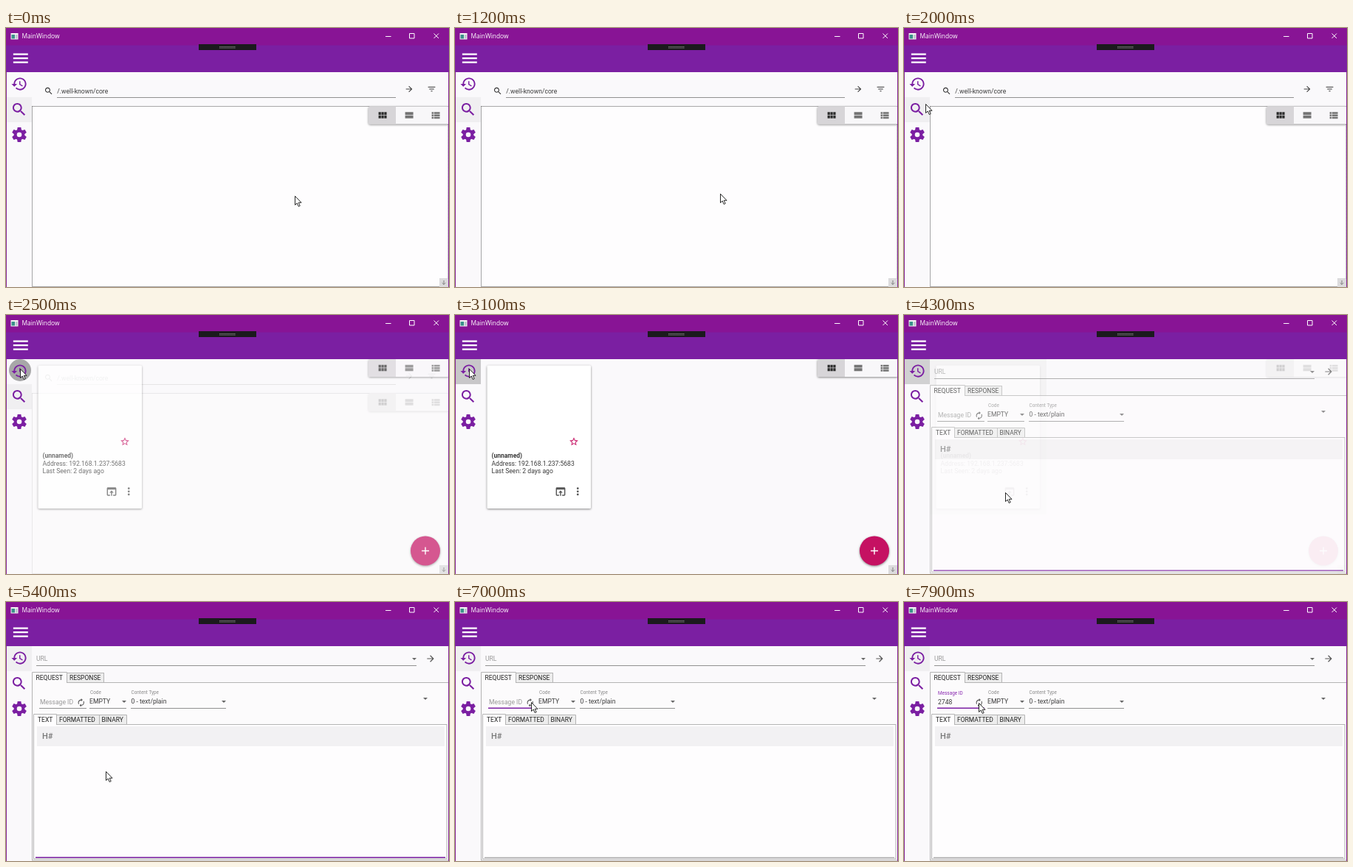
An HTML page for the animation above (8 s loop, 600x352 px).

```html
<!DOCTYPE html>
<html lang="en">
<head>
<meta charset="utf-8">
<title>MainWindow</title>
<style>
  html, body { margin: 0; width: 100%; height: 100%; overflow: hidden; background: #faf9fb; }
  svg { display: block; }
  text { font: 8.6px Roboto, "Open Sans", sans-serif; fill: #3a3a3a; white-space: pre; }
  .small { font-size: 6.4px; fill: #8a8a8a; }
  .hint { fill: #999; }
  .tab { font-size: 8.5px; fill: #222; }
  .title { font: 8.4px "Open Sans", "Noto Sans", sans-serif; fill: #fff; }
  .bold { font-weight: 700; font-size: 8.5px; }
  .side { fill: #7b1fa2; }
  .line { stroke: #909090; fill: none; }
  .card { fill: #fff; filter: drop-shadow(0 1px 1.5px #0007); }
  .box { stroke: #b4b4b4; }
  .accent { stroke: #7b1fa2; stroke-width: 1.6; }
</style>
</head>
<body>
<svg width="600" height="352" viewBox="0 0 600 352">
  <defs>
    <symbol id="menu" viewBox="0 0 24 24"><path d="M3 18h18v-2H3zm0-5h18v-2H3zm0-7v2h18V6z"/></symbol>
    <symbol id="history" viewBox="0 0 24 24"><path d="M13 3c-4.97 0-9 4.03-9 9H1l3.89 3.89.07.14L9 12H6c0-3.87 3.13-7 7-7s7 3.13 7 7-3.13 7-7 7c-1.93 0-3.68-.79-4.94-2.06l-1.42 1.42C8.27 19.99 10.51 21 13 21c4.97 0 9-4.03 9-9s-4.03-9-9-9zm-1 5v5l4.28 2.54.72-1.21-3.5-2.08V8z"/></symbol>
    <symbol id="search" viewBox="0 0 24 24"><path d="M15.5 14h-.79l-.28-.27C15.41 12.59 16 11.11 16 9.5 16 5.91 13.09 3 9.5 3S3 5.91 3 9.5 5.91 16 9.5 16c1.61 0 3.09-.59 4.23-1.57l.27.28v.79l5 4.99L20.49 19zm-6 0C7.01 14 5 11.99 5 9.5S7.01 5 9.5 5 14 7.01 14 9.5 11.99 14 9.5 14z"/></symbol>
    <symbol id="star" viewBox="0 0 24 24"><path d="M22 9.24l-7.19-.62L12 2 9.19 8.63 2 9.24l5.46 4.73L5.82 21 12 17.27 18.18 21l-1.63-7.03zM12 15.4l-3.76 2.27 1-4.28-3.32-2.88 4.38-.38L12 6.1l1.71 4.04 4.38.38-3.32 2.88 1 4.28z"/></symbol>
    <symbol id="open" viewBox="0 0 24 24"><path d="M19 4H5c-1.11 0-2 .9-2 2v12c0 1.1.89 2 2 2h4v-2H5V8h14v10h-4v2h4c1.1 0 2-.9 2-2V6c0-1.1-.89-2-2-2zm-7 6l-4 4h3v6h2v-6h3z"/></symbol>
    <symbol id="more" viewBox="0 0 24 24"><circle cx="12" cy="6" r="2"/><circle cx="12" cy="12" r="2"/><circle cx="12" cy="18" r="2"/></symbol>
    <symbol id="go" viewBox="0 0 24 24"><path d="M12 4l-1.41 1.41L16.17 11H4v2h12.17l-5.58 5.59L12 20l8-8z"/></symbol>
    <symbol id="filter" viewBox="0 0 24 24"><path d="M10 18h4v-2h-4zM3 6v2h18V6zm3 7h12v-2H6z"/></symbol>
    <symbol id="grid" viewBox="0 0 24 24"><path d="M4 11h5V5H4zm0 7h5v-6H4zm6 0h5v-6h-5zm6 0h5v-6h-5zm-6-7h5V5h-5zm6-6v6h5V5z"/></symbol>
    <symbol id="stream" viewBox="0 0 24 24"><path d="M4 18h17v-6H4zM4 5v6h17V5z"/></symbol>
    <symbol id="list" viewBox="0 0 24 24"><path d="M4 14h4v-4H4zm0 5h4v-4H4zM4 9h4V5H4zm5 5h12v-4H9zm0 5h12v-4H9zM9 5v4h12V5z"/></symbol>
    <symbol id="renew" viewBox="0 0 24 24"><path d="M12 6v3l4-4-4-4v3c-4.42 0-8 3.58-8 8 0 1.57.46 3.03 1.24 4.26L6.7 14.8c-.45-.83-.7-1.79-.7-2.8 0-3.31 2.69-6 6-6zm6.76 1.74L17.3 9.2c.44.84.7 1.79.7 2.8 0 3.31-2.69 6-6 6v-3l-4 4 4 4v-3c4.42 0 8-3.58 8-8 0-1.57-.46-3.03-1.24-4.26z"/></symbol>
    <path id="tooth" d="M-2.3 -10h4.6l.8 4.5h-6.2z"/>
    <path id="drop" d="M-3 -1.5h6l-3 3z" fill="#666"/>
    <g id="views">
      <rect class="card" x="491" width="109" height="24" rx="2" style="fill:#f8f7f9"/>
      <path d="M493 0h35v24h-35q-2 0-2-2V2q0-2 2-2z" fill="#d7d5d8"/>
      <use href="#grid" x="502" y="4.5" width="15.5" height="15.5" fill="#2c2c2c"/>
      <g fill="#747474">
        <use href="#stream" x="538" y="4.5" width="15.5" height="15.5"/>
        <use href="#list" x="574" y="4.5" width="15.5" height="15.5"/>
      </g>
    </g>
    <g id="corner">
      <rect x="587" y="340" width="12" height="12" fill="#dcdbdd"/>
      <path d="M593 343v5.5m-2.3-2.2l2.3 2.3 2.3-2.3" fill="none" stroke="#777" stroke-width=".9"/>
    </g>
    <clipPath id="row"><rect x="1" y="60" width="34" height="34"/></clipPath>
  </defs>

  <rect width="600" height="352" fill="#faf9fb"/>

  <!-- sidebar -->
  <rect id="searchRow" x="1" y="94" width="34" height="34" fill="#f0eff1"/>
  <rect id="historyRow" x="1" y="60" width="34" height="34" fill="#f0eff1"/>
  <g clip-path="url(#row)"><circle id="ripple" cx="19" cy="75"/></g>
  <g class="side">
    <use href="#history" x="6.5" y="64.5" width="23" height="23"/>
    <use href="#search" x="6" y="99" width="23.5" height="23.5"/>
    <g id="gear" transform="translate(18 145)"><circle r="5.3" fill="none" stroke="#7b1fa2" stroke-width="4"/></g>
  </g>

  <!-- discovery page -->
  <g id="find">
    <rect x="36" y="107" width="563" height="244" fill="#fefdfe"/>
    <rect x="35.5" y="106.5" width="563.5" height="245" fill="none" stroke="#555" stroke-dasharray="1 1"/>
    <use href="#search" x="51.3" y="79.2" width="13" height="13" fill="#333"/>
    <text x="69.3" y="89">/.well-known/core</text>
    <path class="line" d="M69 94.5H528"/>
    <use href="#go" x="539.5" y="76.5" width="13" height="13" fill="#444"/>
    <use href="#filter" x="570" y="76.5" width="13" height="13" fill="#333"/>
    <use href="#views" y="106.5"/>
    <use href="#corner"/>
  </g>

  <!-- recent devices page -->
  <g id="recent">
    <rect id="hover" x="35" y="60" width="158" height="211" fill="#dad9db"/>
    <rect class="card" x="43.5" y="68.5" width="140.5" height="194.5" rx="1.5"/>
    <use href="#star" x="154" y="165" width="14" height="14" fill="#c51162"/>
    <text class="bold" x="49.5" y="194">(unnamed)</text>
    <text x="49.5" y="205">Address: 192.168.1.237:5683</text>
    <text x="49.5" y="215">Last Seen: 2 days ago</text>
    <g fill="#555">
      <use href="#open" x="134.5" y="231.5" width="17" height="17"/>
      <use href="#more" x="158" y="231.5" width="16.5" height="16.5"/>
    </g>
    <use href="#views" y="60"/>
    <circle class="card" cx="568" cy="320.5" r="20" style="fill:#c51162"/>
    <path d="M568 315.5v10m-5-5h10" stroke="#fff" stroke-width="1.4"/>
    <use href="#corner"/>
  </g>

  <!-- request page -->
  <g id="request">
    <text class="hint" x="41" y="80">URL</text>
    <path class="line" d="M41 86.5H556"/>
    <use href="#drop" x="553" y="77.5"/>
    <use href="#go" x="568" y="70" width="14" height="14" fill="#555"/>

    <rect class="box" x="35.5" y="109.5" width="564" height="241.5" fill="#fcfbfc"/>
    <rect class="box" x="82.5" y="96.5" width="50" height="13" fill="#ededed"/>
    <path class="box" d="M35.5 110V95.5h47V110" fill="#fcfbfc"/>
    <text class="tab" x="40.5" y="105.5">REQUEST</text>
    <text class="tab" x="86" y="106">RESPONSE</text>

    <circle id="press" cx="102" cy="136.500"/>
    <text id="label" class="hint">Message ID</text>
    <text id="value" x="46" y="139">2748</text>
    <use href="#renew" x="95.5" y="130.500" width="12.5" height="12.5" fill="#555"/>
    <path class="line" d="M45 144.5h64M113 144.5h50M169 144.5h129"/>
    <path id="focus" class="accent"/>
    <text class="small" x="114" y="125">Code</text>
    <text x="113" y="138">EMPTY</text>
    <use href="#drop" x="160" y="135.500"/>
    <text class="small" x="169.5" y="125">Content Type</text>
    <text x="169.500" y="138">0 - text/plain</text>
    <use href="#drop" x="295" y="135.500"/>
    <use href="#drop" x="568" y="131.500"/>

    <rect class="box" x="37.5" y="166.500" width="559.5" height="182.5" fill="#fefdfe"/>
    <path class="box" d="M68.5 153.5h95v13h-95zM126.500 153.5v13" fill="#ededed"/>
    <path class="box" d="M37.500 167v-14.500h31V167" fill="#fefdfe"/>
    <text class="tab" x="43" y="162.5">TEXT</text>
    <text class="tab" x="72" y="163">FORMATTED</text>
    <text class="tab" x="129.500" y="163">BINARY</text>
    <rect x="42" y="169" width="552" height="27" fill="#f2f1f3"/>
    <text x="49" y="186" style="font-size:11px;font-weight:500;fill:#777">H#</text>
    <path id="bottom" d="M40 347.300H595"/>
  </g>

  <!-- window frame -->
  <path d="M.5 23V352M599.5 23V352" stroke="#8a2a9c"/>
  <rect y="22" width="600" height="38" fill="#7b1fa2"/>
  <rect width="600" height="23.500" fill="#881495"/>
  <rect x="6.500" y="7" width="10" height="8.500" fill="#f4f4f4"/>
  <rect x="7.500" y="9" width="4.500" height="5.500" fill="#3b8f8a"/>
  <rect x="12.800" y="9" width="2.700" height="5.500" fill="#b9c4cc"/>
  <text class="title" x="21.500" y="14.300">MainWindow</text>
  <path d="M514 11.500h7.500M546.500 7.500h6.500v6.500h-6.500zM579.500 7.500l6.500 6.500m0-6.500l-6.500 6.500" fill="none" stroke="#fff"/>
  <use href="#menu" x="6.500" y="27.800" width="26.600" height="26.600" fill="#fff"/>
  <rect x="261" y="22" width="78" height="8" fill="#1b1a1d"/>
  <path d="M289 25.500h22M289 27.200h22" stroke="#777" stroke-dasharray="1.500 .5"/>

  <g id="cursor" stroke="#111" stroke-width=".9" stroke-linejoin="round" fill="#fff">
    <path id="arrow" d="M.5 .5V12.500L3.200 10 5.200 14.500 7.200 13.600 5.200 9.300H9z"/>
    <path id="hand" d="M-1.300 1.200q1.300-1.600 2.600 0v5l5 1.200q1.600.5 1.500 2.300l-1 4.500v2.300H.3v-1.700l-4-5q-.4-1.600 1.300-1.300l1.100 1zM1.300 6.200v2.600M3.700 7v2"/>
  </g>
</svg>
<script>
const $ = id => document.getElementById(id);
const LOOP = 8000, STEP = 100;

for (let i = 0; i < 6; i++) {
  $("gear").insertAdjacentHTML("beforeend", `<use href="#tooth" transform="rotate(${i * 60})"/>`);
}

// rows: time, then one or more values; linear between rows
const path = [
  [1100, 391, 228], [1200, 359, 225], [1400, 258, 200], [1700, 110, 148],
  [2000, 29, 103], [2100, 22, 85], [2200, 19, 73],
  [3200, 19, 73], [3300, 26, 84], [3500, 92, 185], [3700, 134, 250],
  [3900, 137, 247], [4100, 137, 241],
  [5300, 137, 241], [5400, 135, 230], [5700, 119, 178], [6000, 107, 143],
  [6200, 104, 135], [6600, 103, 136], [7000, 103, 136], [7600, 101, 137]
];
const findFade = [[2300, 1], [2400, .6], [2500, .2], [2700, 0]];
const recentFade = [[2300, 0], [2400, .3], [2500, .7], [2700, 1], [4100, 1], [4200, .6], [4300, .2], [4500, 0]];
const requestFade = [[4100, 0], [4200, .3], [4300, .7], [4600, 1]];
const rippleSize = [[2300, 0], [2400, 9], [2500, 15], [2800, 27]];
const rippleFade = [[2300, 0], [2400, .33], [2600, .33], [3100, .2], [4200, .2], [4600, 0]];
const rowFade = [[4100, 0], [4600, 1]];
const focusSize = [[6200, 0], [6300, 12], [6500, 32]];
const pressSize = [[7000, 0], [7400, 14]];
const pressFade = [[7000, 0], [7100, .12], [7300, .1], [7700, 0]];
const lift = [[7000, 0], [7200, .6], [7400, 1]];

function at(rows, t) {
  const n = rows.findIndex(r => r[0] > t);
  if (n === 0) return rows[0].slice(1);
  if (n < 0) return rows[rows.length - 1].slice(1);
  const a = rows[n - 1], b = rows[n], k = (t - a[0]) / (b[0] - a[0]);
  return a.slice(1).map((v, i) => v + (b[i + 1] - v) * k);
}

function set(id, attrs) {
  for (const key in attrs) $(id).setAttribute(key, attrs[key]);
}

function fade(id, rows, t) {
  const [o] = at(rows, t);
  set(id, { opacity: o, visibility: o > 0 ? "visible" : "hidden" });
}

function draw(t) {
  const [x, y] = at(path, t);
  const onCard = t >= 3400 && t < 4300;
  set("cursor", { transform: `translate(${x} ${y})` });
  set("hand", { opacity: +onCard });
  set("arrow", { opacity: +!onCard });
  set("hover", { opacity: +(t >= 3400) });

  fade("find", findFade, t);
  fade("recent", recentFade, t);
  fade("request", requestFade, t);
  fade("historyRow", rowFade, t);
  set("searchRow", { opacity: +(t < 2700) });
  set("ripple", { r: at(rippleSize, t)[0] });
  fade("ripple", rippleFade, t);

  const half = at(focusSize, t)[0];
  set("focus", { d: `M${77 - half} 144.300h${2 * half}`, opacity: +(half > 0) });
  set("bottom", { stroke: t < 6200 ? "#7b1fa2" : "#999", "stroke-width": t < 6200 ? 1.4 : 1 });
  set("press", { r: at(pressSize, t)[0] });
  fade("press", pressFade, t);

  const k = at(lift, t)[0];
  set("label", {
    transform: `translate(46 ${139 - 13 * k}) scale(${1 - .25 * k})`,
    style: k > 0 ? "fill:#8a28b0" : ""
  });
  set("value", { opacity: +(t >= 7100) });
}

function tick(now) {
  draw(Math.floor(now % LOOP / STEP) * STEP);
  requestAnimationFrame(tick);
}
draw(0);
let start;
requestAnimationFrame(function first(now) {
  start = now;
  requestAnimationFrame(function run(n) {
    draw(Math.floor((n - start) % LOOP / STEP) * STEP);
    requestAnimationFrame(run);
  });
});
</script>
</body>
</html>
```
